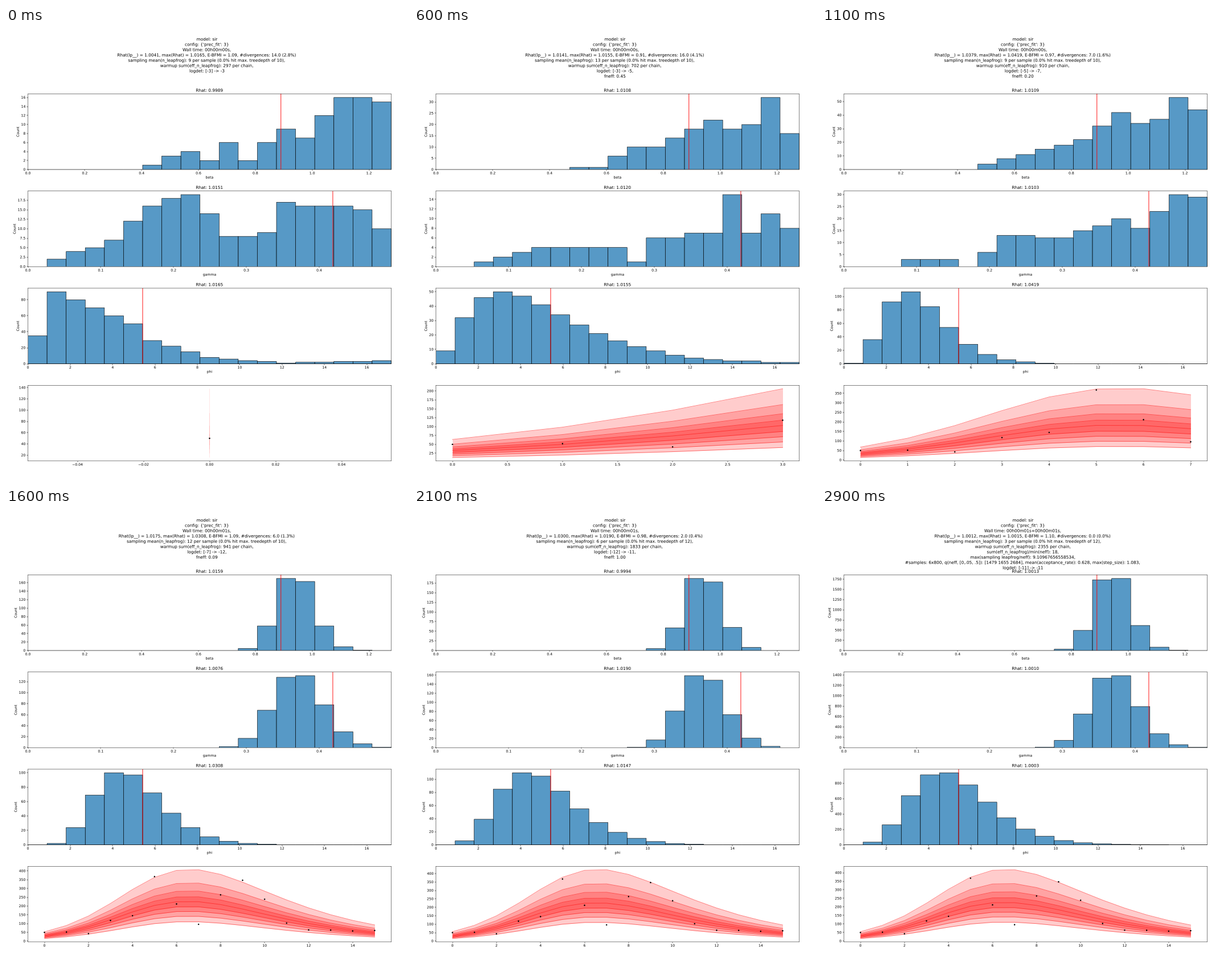
Write a matplotlib script that moves like this. It is 706 px wide and 794 px high and loops after 3100 ms.

```python
import numpy as np
import matplotlib.pyplot as plt
from matplotlib import patheffects
from matplotlib.animation import FuncAnimation
from matplotlib.colors import to_rgba

W, H, DPI = 706, 794, 44.125
LEFT, RIGHT, TOP, PITCH, HEIGHT = 38.5, 676.5, 115.5, 170.25, 132.6
BINS = 19
PARAMS = [("beta", 1.278, 0.890), ("gamma", 0.499, 0.4188), ("phi", 17.155, 5.418)]
CASES = [50, 52, 43, 118, 145, 368, 212, 96, 264, 347, 239, 103, 64, 63, 58, 61]

# Log-scale places of the nine quantile curves between the outer two
SPREAD = [-1, -0.65, -0.4, -0.195, 0, 0.195, 0.4, 0.65, 1]

# Subpixel placement of lines and glyphs
plt.rcParams.update({"font.family": "DejaVu Sans", "path.snap": False,
                     "path.effects": [patheffects.Normal()]})
fig = plt.figure(figsize=(W / DPI, H / DPI + 1e-9), dpi=DPI, facecolor="white")
scenes = []


def panel(row):
    bottom = TOP + row * PITCH + HEIGHT
    return fig.add_axes([LEFT / W, 1 - bottom / H, (RIGHT - LEFT) / W, HEIGHT / H],
                        label=f"{len(scenes)}-{row}")


def header(lines):
    return [fig.text(0.5, 1 - (22.1 + 9.27 * i) / H, line, fontsize=12,
                     ha="center", va="baseline")
            for i, line in enumerate(lines)]


def hump(height, mode, sharp):
    """Counts following a gamma density, with the mode in bin widths."""
    r = (np.arange(BINS) + 0.5) / mode
    return np.round(height * (r * np.exp(1 - r)) ** sharp)


def ridge(*points):
    """Counts running straight between (bin, count) turning points."""
    return np.round(np.interp(np.arange(BINS), *zip(*points)))


def histogram(row, rhat, counts):
    name, xmax, truth = PARAMS[row]
    ax = panel(row)
    width = xmax / BINS
    ax.bar(np.arange(BINS) * width, counts, width, align="edge",
           color=to_rgba("C0", 0.75), edgecolor="black", linewidth=1)
    ax.axvline(truth, color="red")
    ax.set(xlim=(0, xmax), ylim=(0, counts.max() * 1.05), xlabel=name,
           ylabel="Count", title=f"Rhat: {rhat}")
    return ax


def epidemic(days, beta, gamma, infected, people=1000, steps=100):
    """Daily number of infected in an SIR model."""
    healthy = people - infected
    daily = [infected]
    for _ in range(days - 1):
        for _ in range(steps):
            new = beta * healthy * infected / people / steps
            healthy -= new
            infected += new - gamma * infected / steps
        daily.append(infected)
    return np.array(daily)


def fan(days, beta, gamma, infected, up, down):
    ax = panel(3)
    x = np.arange(days)
    median = 0.91 * epidemic(days, beta, gamma, infected)
    up = np.geomspace(*up, days)
    curves = [median * (up ** z if z > 0 else down ** -z) for z in SPREAD]
    for low, high in zip(curves[:4], curves[:4:-1]):
        if days == 1:
            ax.vlines(x, low, high, color="red", alpha=0.2, lw=0.8)
        else:
            ax.fill_between(x, low, high, color="red", alpha=0.2, lw=0)
    for curve in curves:
        ax.plot(x, curve, color="red", alpha=0.5)
    ax.plot(x, CASES[:days], "k.")
    return ax


def scene(stats, leaps, depth, warmup, tail, hists, model, wall="00h00m00s"):
    rhat_lp, rhat_max, bfmi, div = stats
    artists = header([
        "model: sir",
        "config: {'prec_fit': 3}",
        f"Wall time: {wall},",
        f"Rhat(lp__) = {rhat_lp}, max(Rhat) = {rhat_max}, E-BFMI = {bfmi}, #divergences: {div}",
        f"sampling mean(n_leapfrog): {leaps} per sample (0.0% hit max. treedepth of {depth}),",
        f"warmup sum(eff_n_leapfrog): {warmup} per chain,",
        *tail,
    ])
    artists += [histogram(row, *h) for row, h in enumerate(hists)]
    artists.append(fan(*model))
    for a in artists:
        a.set_visible(False)
    scenes.append(artists)


scene(("1.0041", "1.0165", "1.09", "14.0 (2.8%)"), 9, 10, 297,
      ["logdet: [-3] -> -3"],
      [("0.9989", ridge((5, 0), (8, 4), (9, 2), (10, 6), (11, 2), (13, 9), (14, 7),
                        (16, 16), (18, 15))),
       ("1.0151", ridge((0, 0), (4, 7), (6, 16), (8, 19), (10, 8), (12, 9), (13, 17),
                        (17, 15), (18, 10))),
       ("1.0165", ridge((0, 35), (1, 90), (3, 70), (5, 50), (6, 29), (9, 8), (13, 1),
                        (18, 4)))],
      (1, 1.1, 0.4, 51.6, (2.94, 2.94), 0.34))

scene(("1.0661", "1.0828", "1.14", "11.0 (4.4%)"), 11, 10, 688,
      ["logdet: [-3] -> -3,", "fneff: 0.50"],
      [("1.0281", ridge((2, 0), (3, 1), (5, 0), (8, 3), (11, 2), (13, 9), (14, 8),
                        (15, 18), (18, 13))),
       ("1.0828", ridge((0, 3), (2, 3), (4, 0), (6, 2), (7, 9), (10, 1), (11, 9),
                        (15, 7), (17, 10), (18, 4))),
       ("1.0486", hump(48, 2.3, 2.5) + hump(11, 8.2, 20))],
      (2, 1.1, 0.4, 44, (2.38, 2.84), 0.3))

scene(("1.0141", "1.0155", "0.91", "16.0 (4.1%)"), 13, 10, 702,
      ["logdet: [-3] -> -5,", "fneff: 0.45"],
      [("1.0108", ridge((5, 0), (8, 1), (10, 10), (11, 10), (14, 22), (15, 18),
                        (16, 20), (17, 32), (18, 16))),
       ("1.0120", ridge((1, 0), (5, 4), (9, 4), (10, 1), (11, 6), (14, 7), (15, 15),
                        (16, 7), (17, 11), (18, 8))),
       ("1.0155", hump(50, 3.5, 1.6))],
      (4, 0.85, 0.38, 36, (1.95, 2.0), 0.4))

scene(("1.0379", "1.0419", "0.97", "7.0 (1.6%)"), 9, 10, 910,
      ["logdet: [-5] -> -7,", "fneff: 0.20"],
      [("1.0109", ridge((6, 0), (7, 4), (12, 22), (14, 42), (15, 34), (16, 37),
                        (17, 53), (18, 44))),
       ("1.0103", ridge((2, 0), (3, 3), (5, 3), (6, 0), (8, 13), (11, 12), (14, 20),
                        (15, 16), (17, 30), (18, 29))),
       ("1.0419", hump(108, 3.3, 4.5))],
      (8, 1.07, 0.49, 38, (1.97, 2.08), 0.39))

scene(("1.0175", "1.0308", "1.09", "6.0 (1.3%)"), 12, 10, 941,
      ["logdet: [-7] -> -12,", "fneff: 0.09"],
      [("1.0159", hump(190, 13.95, 205)),
       ("1.0076", hump(139, 14.03, 112)),
       ("1.0308", hump(103, 4.9, 8))],
      (16, 0.93, 0.37, 34, (1.72, 1.92), 0.49), "00h00m01s")

scene(("1.0300", "1.0190", "0.98", "2.0 (0.4%)"), 6, 12, 1833,
      ["logdet: [-12] -> -11,", "fneff: 1.00"],
      [("0.9994", hump(210, 13.95, 219)),
       ("1.0190", hump(168, 13.9, 135)),
       ("1.0147", hump(111, 4.8, 6))],
      (16, 0.93, 0.37, 34, (1.8, 1.98), 0.49), "00h00m01s")

scene(("1.0012", "1.0015", "1.10", "0.0 (0.0%)"), 3, 12, 2355,
      ["sum(eff_n_leapfrog)/min(neff): 18,",
       "max(sampling leapfrog/neff): 9.10967656558534,",
       "#samples: 6x800, q(neff, [0,.05, .5]): [1479 1655 2684], "
       "mean(acceptance_rate): 0.628, max(step_size): 1.083,",
       "logdet: [-11] -> -11"],
      [("1.0013", hump(2022, 14.01, 225)),
       ("1.0010", hump(1478, 14.05, 125)),
       ("1.0003", hump(955, 5.1, 6.4))],
      (16, 0.93, 0.37, 34, (1.78, 1.95), 0.49), "00h00m01s+00h00m01s")


def update(i):
    # The first scene is a short flash, the others hold for half a second
    current = 0 if i == 0 else 1 + (i - 1) // 5
    for k, artists in enumerate(scenes):
        for a in artists:
            a.set_visible(k == current)
    return scenes[current]


anim = FuncAnimation(fig, update, frames=31, interval=100, repeat=True,
                     repeat_delay=0, blit=False)
plt.show()
```
